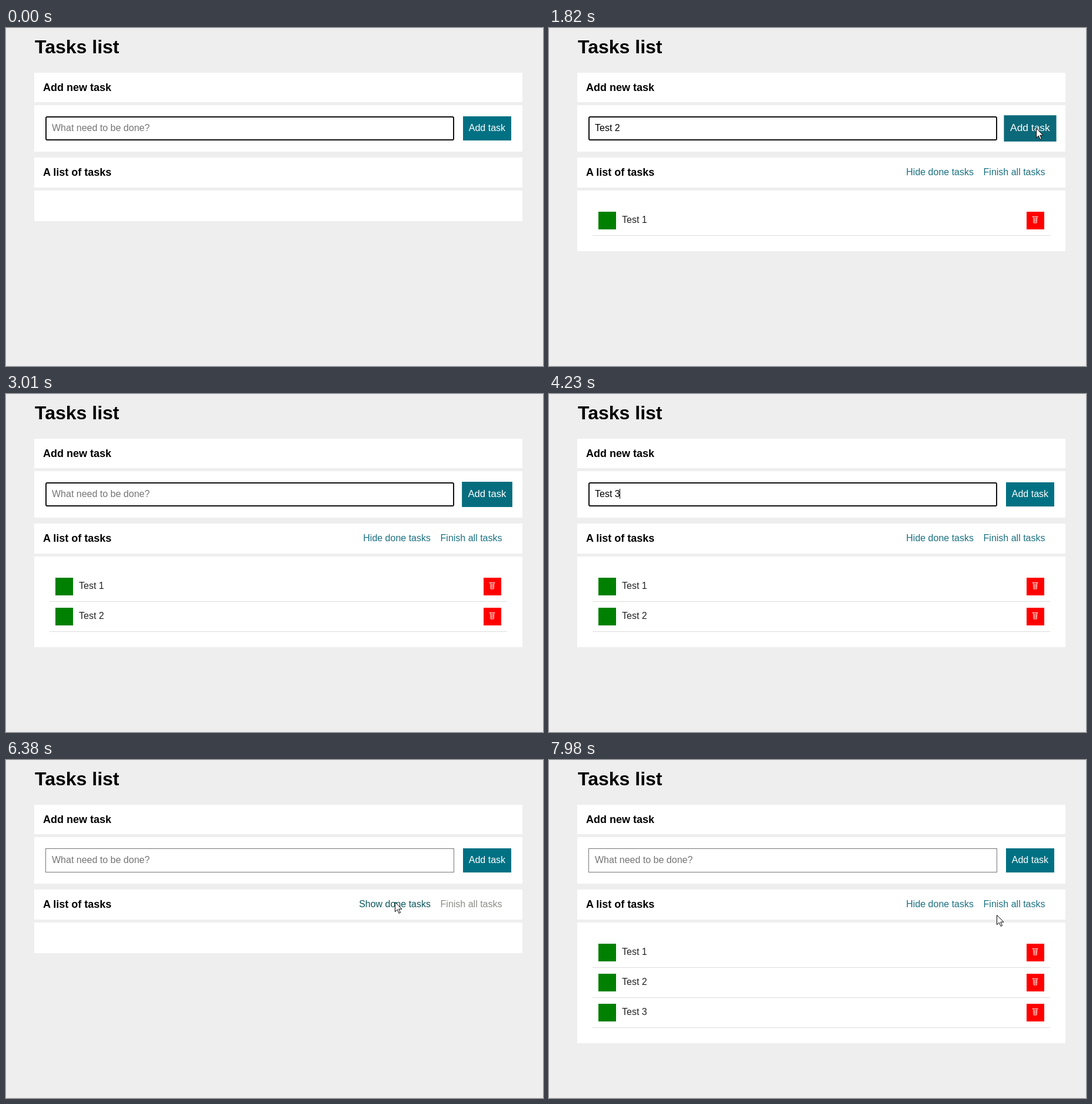
These frames come from a looping animation (913 px wide and 574 px high, 8 s). An HTML page:

```html
<!DOCTYPE html>
<html lang="en">
<head>
<meta charset="utf-8">
<title>Tasks list</title>
<style>
  html, body { margin: 0; height: 100%; overflow: hidden; background: #eee; }
  svg { display: block; font: 16px "Liberation Sans", Arial, sans-serif; }
  text { white-space: pre; }
  .panel { fill: #fff; }
  h1, .title { font-weight: bold; }
  .title { font-size: 18px; }
  .link { fill: #1b7182; text-anchor: end; }
  .link.hover { fill: #0b575c; }
  .link.disabled { fill: #8c8c88; }
  .done { text-decoration: line-through; }
</style>
</head>
<body>
<svg width="913" height="574" viewBox="0 0 913 574">
  <rect width="913" height="574" fill="#eee"/>
  <text x="49" y="43" font-size="32" font-weight="bold">Tasks list</text>

  <rect class="panel" x="48" y="76" width="830" height="50"/>
  <text class="title" x="63" y="107">Add new task</text>

  <rect class="panel" x="48" y="131" width="830" height="79"/>
  <rect id="blurred" x="67.5" y="150.5" width="694" height="40" fill="none" stroke="#767676"/>
  <rect id="focused" x="68" y="151" width="693" height="39" rx="2" fill="none" stroke="#101010" stroke-width="2"/>
  <text id="entry" x="78" y="175"></text>
  <rect id="caret" y="161" width="1" height="17"/>
  <g id="button">
    <rect id="buttonFace" x="777" y="150" width="82" height="41"/>
    <text x="786.8" y="175" fill="#fff">Add task</text>
  </g>

  <rect class="panel" x="48" y="220" width="830" height="51"/>
  <text class="title" x="63" y="251">A list of tasks</text>
  <g id="links">
    <text id="toggle" class="link" x="722" y="250"></text>
    <text id="finish" class="link" x="843.5" y="250">Finish all tasks</text>
  </g>

  <rect id="list" class="panel" x="48" y="276" width="830"/>
  <g id="rows"></g>
  <path id="pointer" d="M.5 .5v16.2l3.8-3.6 2.8 6.2 2.5-1.1-2.8-6h5.2z" fill="#fff" stroke="#000"/>
</svg>
<script>
const LOOP = 8000;
const ROW_HEIGHT = 51;

// One entry per task: key press times, then the moment it is submitted.
const tasks = [
  { text: 'Test 1', keys: [70, 140, 280, 350, 410, 540], added: 680, checked: 5130, unchecked: 7210 },
  { text: 'Test 2', keys: [880, 1010, 1140, 1340, 1410, 1480], added: 2400, checked: 5410, unchecked: 7490 },
  { text: 'Test 3', keys: [3430, 3630, 3730, 3830, 4030, 4230], added: 4510, checked: 5830, unchecked: 7840 },
];

// Pointer strokes as [time, x, y]; the pointer is hidden between strokes.
const strokes = [
  [[1480, 620, 172], [1620, 750, 173], [1760, 828, 170], [2730, 828, 172], [2940, 590, 500], [3010, 540, 574]],
  [[4720, 300, 432], [4930, 105, 330], [5200, 99, 328], [5400, 100, 378], [5480, 100, 380], [5690, 101, 419],
   [5830, 102, 430], [5900, 104, 453], [6110, 560, 262], [6250, 660, 240], [6650, 663, 244], [6720, 650, 250],
   [6860, 400, 290], [7070, 100, 325], [7210, 100, 327], [7420, 100, 378], [7490, 100, 379], [7700, 101, 432],
   [7840, 103, 438], [7980, 761, 263], [LOOP, 761, 263]],
];

const $ = id => document.getElementById(id);
const between = (t, a, b) => t >= a && t < b;
const show = (node, visible) => node.setAttribute('display', visible ? 'inline' : 'none');
const mix = (a, b, k) => a + (b - a) * k;

// The CSS "ease" curve.
function ease(p) {
  if (p <= 0 || p >= 1) return p <= 0 ? 0 : 1;
  const bezier = (s, a, b) => 3 * s * (1 - s) ** 2 * a + 3 * s * s * (1 - s) * b + s ** 3;
  let low = 0, high = 1;
  for (let i = 0; i < 20; i++) {
    const mid = (low + high) / 2;
    if (bezier(mid, .25, .25) < p) low = mid; else high = mid;
  }
  return bezier(low, .1, 1);
}

$('rows').innerHTML = tasks.map((task, i) => `
  <g transform="translate(0 ${i * ROW_HEIGHT})">
    <rect x="84" y="312" width="30" height="30" fill="#008000"/>
    <path class="mark" fill="#fff" d="M92.5 327l2.2-1.6 2.3 2.8q3-5.6 6.6-9l1.6.8q-4.6 5.5-7.3 12h-1.7z"/>
    <text class="label" x="124" y="331" fill="#222">${task.text}</text>
    <rect x="812" y="312" width="30" height="30" fill="#f00"/>
    <path d="M821.5 320.5h10M823.5 321l.6 10h5l.6-10M825.6 322v7.5M827.8 322v7.5" fill="none" stroke="#ffe9e0"/>
    <rect x="74" y="352" width="778" height="1" fill="#ddd"/>
  </g>`).join('');
const rows = [...$('rows').children];

function drawEntry(t) {
  const task = tasks.find(task => t < task.added);
  const typed = task ? task.text.slice(0, task.keys.filter(time => time <= t).length) : '';
  const presses = tasks.flatMap(task => [...task.keys, task.added]).filter(time => time <= t);
  const focused = t < 5130;
  $('entry').textContent = typed || 'What need to be done?';
  $('entry').setAttribute('fill', typed ? '#000' : '#757575');
  $('caret').setAttribute('x', typed ? Math.floor(78 + $('entry').getComputedTextLength()) : 78);
  show($('caret'), focused && presses.length && t - presses.at(-1) < 330);
  show($('focused'), focused);
  show($('blurred'), !focused);
}

function drawButton(t) {
  const hover = t < 2775 ? ease((t - 1690) / 500) : 1 - ease((t - 2775) / 500);
  const scale = 1 + .2 * hover;
  if (hover) $('button').setAttribute('transform', `translate(818 170.5) scale(${scale}) translate(-818 -170.5)`);
  else $('button').removeAttribute('transform');
  $('buttonFace').setAttribute('fill', `rgb(${mix(0, 28, hover)}, ${mix(113, 95, hover)}, ${mix(131, 108, hover)})`);
}

function drawList(t) {
  const hidden = between(t, 6320, 6580);
  const isDone = task => between(t, task.checked, task.unchecked);
  const isVisible = task => t >= task.added && !(hidden && isDone(task));
  $('list').setAttribute('height', 52 + ROW_HEIGHT * tasks.filter(isVisible).length);
  tasks.forEach((task, i) => {
    show(rows[i], isVisible(task));
    show(rows[i].querySelector('.mark'), isDone(task));
    rows[i].querySelector('.label').classList.toggle('done', isDone(task));
  });
  show($('links'), t >= tasks[0].added);
  $('toggle').textContent = (hidden ? 'Show' : 'Hide') + ' done tasks';
  $('toggle').classList.toggle('hover', between(t, 6180, 6720));
  $('finish').classList.toggle('disabled', tasks.every(isDone));
}

function drawPointer(t) {
  const stroke = strokes.find(points => between(t, points[0][0], points.at(-1)[0]));
  show($('pointer'), stroke);
  if (!stroke) return;
  const next = stroke.findIndex(point => point[0] > t);
  const [t0, x0, y0] = stroke[next - 1], [t1, x1, y1] = stroke[next];
  const k = (t - t0) / (t1 - t0);
  $('pointer').setAttribute('transform', `translate(${Math.round(mix(x0, x1, k))} ${Math.round(mix(y0, y1, k))})`);
}

function frame() {
  const t = performance.now() % LOOP;
  drawEntry(t);
  drawButton(t);
  drawList(t);
  drawPointer(t);
  requestAnimationFrame(frame);
}
frame();
</script>
</body>
</html>
```
